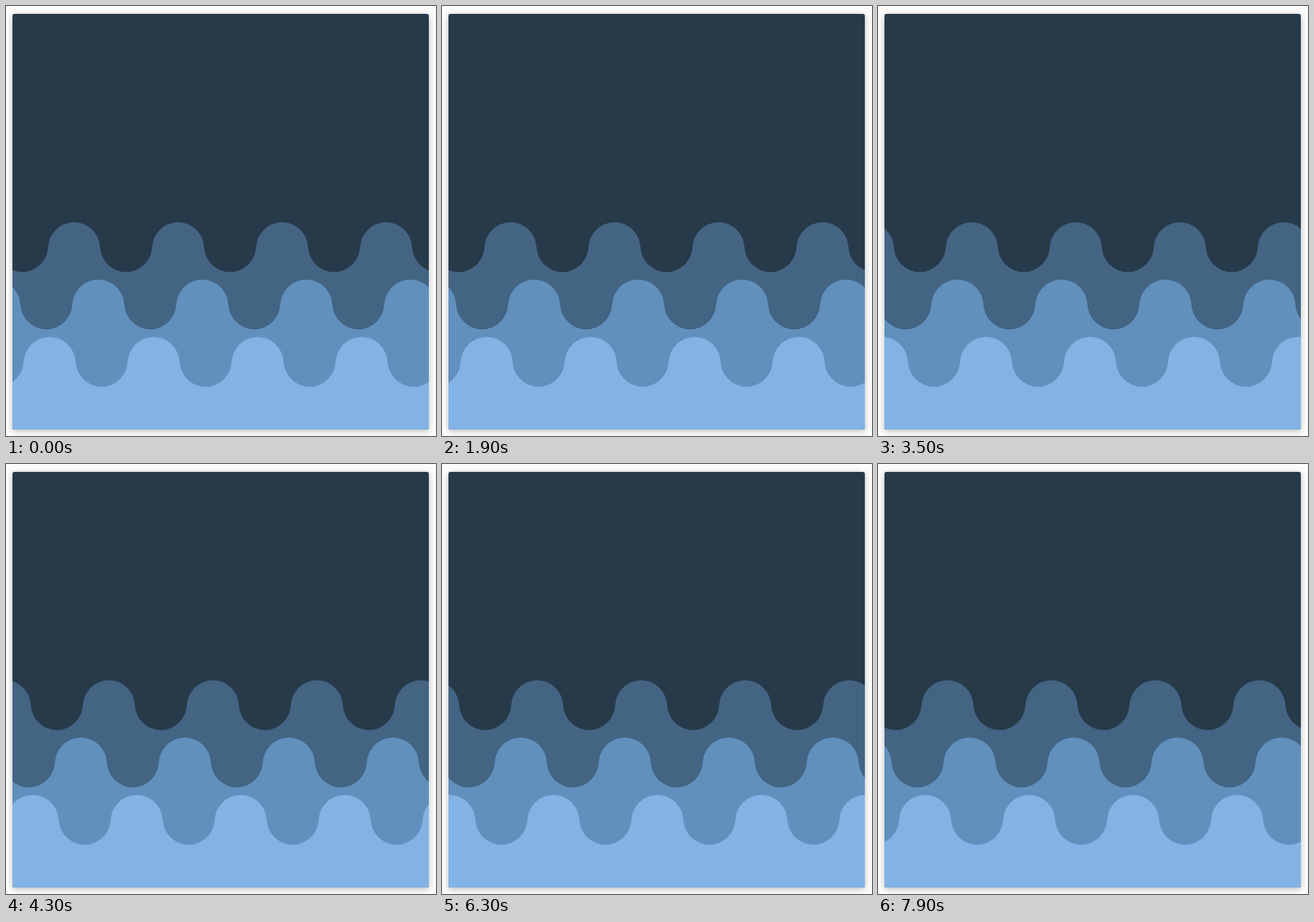
An HTML page for the animation above (8000 ms loop, 600 by 600 pixels).

```html
<!DOCTYPE html>
<html lang="en">
<head>
<meta charset="utf-8">
<title>Waves</title>
<style>
  html, body { margin: 0; width: 100%; height: 100%; overflow: hidden; background: #fcfcfc; }
  svg {
    position: absolute; left: 9px; top: 11px; width: 580.5px; height: 580px;
    overflow: hidden; border-radius: 3px; background: #273a4a;
    box-shadow: 0 2px 9px rgba(0, 0, 0, .27);
  }
</style>
</head>
<body>
<svg id="sea"></svg>
<script>
const LOOP = 8000, STEP = 100;
const TURN = 930, SWING = 4015; // time of the first turning point, length of one swing
const LENGTH = 145.1, R = LENGTH / 4;

// x: crest position at the turning point, y: top of the crests, range: travel of one swing
const layers = [
  { color: '#446483', x: 79.6, y: 290.8, range: 58 },
  { color: '#6190bd', x: 123, y: 370.8, range: -29 },
  { color: '#83b2e4', x: 35.8, y: 450.8, range: LENGTH },
];

function wavePath(top) {
  const left = -2 * LENGTH - R;
  const crest = `V${top + R}a${R} ${R} 0 0 1 ${2 * R} 0`;
  const trough = `V${top + 69.4 - R}a${R} ${R} 0 0 0 ${2 * R} 0`;
  return `M${left} 600` + (crest + trough).repeat(8) + `V600H${left}Z`;
}

for (const layer of layers) {
  layer.path = document.createElementNS('http://www.w3.org/2000/svg', 'path');
  layer.path.setAttribute('d', wavePath(layer.y));
  layer.path.setAttribute('fill', layer.color);
  sea.append(layer.path);
}

// cubic-bezier(.42, 0, .58, 1), solved by bisection
function easeInOut(x) {
  let low = 0, high = 1, s;
  for (let i = 0; i < 24; i++) {
    s = (low + high) / 2;
    if (s * (1.26 + s * (0.52 * s - 0.78)) < x) low = s; else high = s;
  }
  return s * s * (3 - 2 * s);
}

function draw(now) {
  const time = Math.floor(now % LOOP / STEP) * STEP;
  const swing = Math.abs(time - TURN) / SWING;
  const p = easeInOut(1 - Math.abs(1 - swing));
  for (const { path, x, range } of layers) {
    path.setAttribute('transform', `translate(${x + range * p} 0)`);
  }
}

function frame() {
  draw(performance.now());
  requestAnimationFrame(frame);
}
frame();
</script>
</body>
</html>
```
